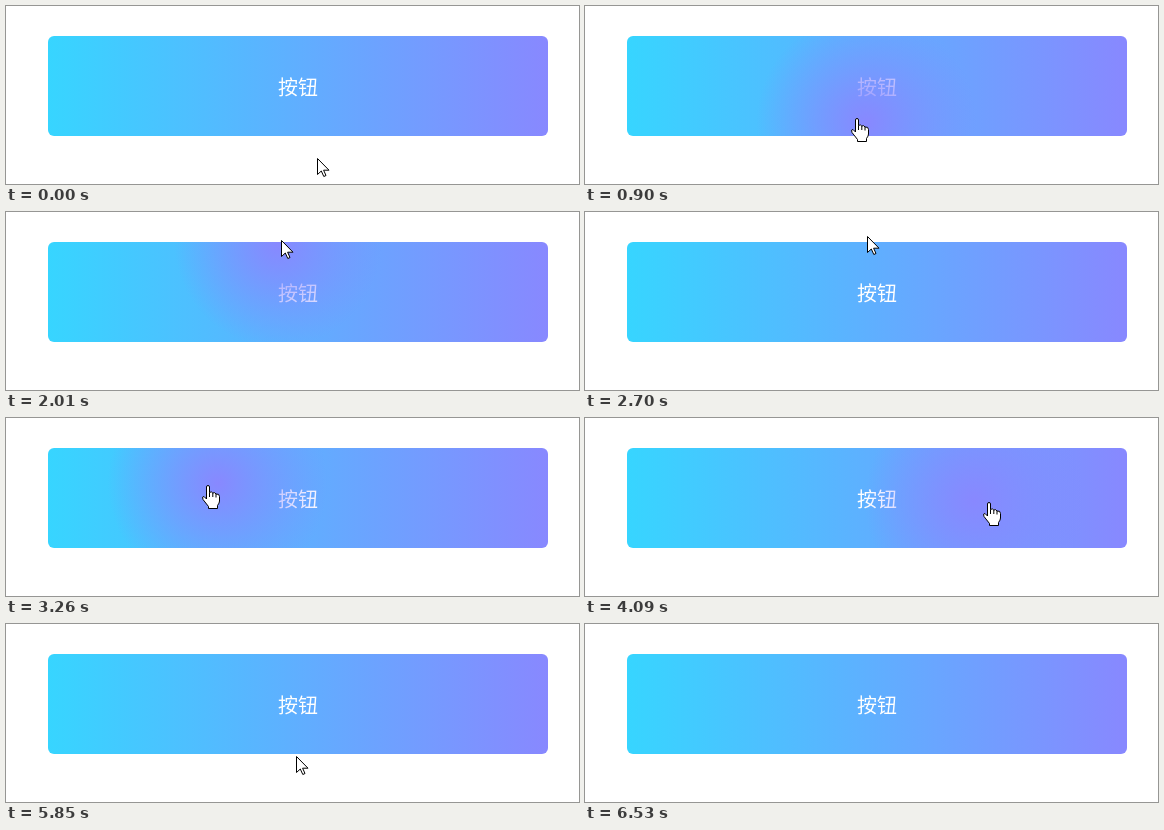
An HTML page that plays this animation: 573 px wide and 178 px high, repeating every 6.86 s.

```html
<!DOCTYPE html>
<html lang="zh-CN">
<head>
<meta charset="utf-8">
<title>按钮</title>
<style>
  html, body { margin: 0; width: 100%; height: 100%; overflow: hidden; background: #fff; }
  .button {
    position: absolute; left: 42px; top: 30px; width: 500px; height: 100px;
    border-radius: 6px; overflow: hidden;
    background: linear-gradient(to right, #37d5ff, #8888ff);
    color: #fff; text-align: center;
    font: 20px/102px "Noto Sans CJK SC", "Noto Sans CJK", sans-serif;
  }
  .glow {
    position: absolute; left: 0; top: 0; border-radius: 50%;
    background: radial-gradient(circle closest-side, #8888ff, transparent);
  }
  svg { position: absolute; left: 0; top: 0; width: 24px; height: 28px; overflow: visible; }
  svg path { fill: #fff; stroke: #000; stroke-linejoin: round; }
</style>
</head>
<body>
<div class="button">按钮<div class="glow"></div></div>
<svg class="arrow"><path d="M.5 .5V16.5L4.3 13L6.8 18.5L9 17.5L6.6 12.2H12Z"/></svg>
<svg class="hand"><path d="M-2.5 14V2Q-2.5 .5-1 .5T.5 2V7.5Q2.5 6 3.8 8Q6 6.800 7 9Q10.500 8.500 10.500 11.500V16Q10.500 18 8.500 20.500V23.500H-.5V21.500L-6 14.500Q-7.500 11.500-5 11.500Z"/><path d="M.5 7.500V12M3.800 8V12M7 9V12.500" fill="none"/></svg>
<script>
const LOOP = 6860, STEP = 69.3, GONE = 6500;
const LAG = 60, GROW = 200, SIZE = 220;
const BOX = { x: 42, y: 30, w: 500, h: 100 };

// Turning points of the pointer: time, x, y
const path = [
  [0, 311, 152], [660, 308, 128], [900, 273, 112], [1280, 247, 82],
  [2010, 275, 28], [2290, 293, 15], [2490, 293, 15], [3260, 203, 67],
  [3500, 166, 69], [4140, 409, 86], [4560, 303, 100], [5120, 282, 140],
  [5400, 285, 126], [5520, 286, 132], [5850, 291, 132], [6040, 330, 128],
  [GONE, 437, 166]
];

const $ = s => document.querySelector(s);
const glow = $('.glow'), arrow = $('.arrow'), hand = $('.hand');
const clamp = v => Math.max(0, Math.min(1, v));
const smooth = v => v * v * (3 - 2 * v);

// Smooth curve that never overshoots a turning point
function slope(i, axis) {
  if (i === 0 || i === path.length - 1) return 0;
  const rate = j => (path[j + 1][axis] - path[j][axis]) / (path[j + 1][0] - path[j][0]);
  const a = rate(i - 1), b = rate(i);
  return a * b > 0 ? 2 * a * b / (a + b) : 0;
}

function coord(t, axis) {
  const next = path.findIndex(p => p[0] > t);
  if (next < 1) return path[next ? path.length - 1 : 0][axis];
  const i = next - 1, a = path[i], b = path[next];
  const span = b[0] - a[0], k = (t - a[0]) / span, r = 1 - k;
  return a[axis] + (b[axis] - a[axis]) * smooth(k) +
    span * k * r * (r * slope(i, axis) - k * slope(next, axis));
}

const pointAt = t => [coord(t, 1), coord(t, 2)];

function isInside(t) {
  const [x, y] = pointAt(t);
  return x >= BOX.x && x < BOX.x + BOX.w && y >= BOX.y && y < BOX.y + BOX.h;
}

// Spans of time the pointer spends over the button
const hovers = [];
for (let t = 10; t < LOOP; t += 10) {
  if (!isInside(t)) continue;
  if (!isInside(t - 10)) hovers.push({ from: t });
  hovers[hovers.length - 1].to = t + 10;
}

function place(el, x, y, visible) {
  el.style.display = visible ? '' : 'none';
  el.style.transform = `translate(${x}px, ${y}px)`;
}

function draw(t) {
  const [x, y] = pointAt(t).map(Math.round);
  const inside = isInside(t);
  place(arrow, x, y, !inside && t <= GONE);
  place(hand, x, y, inside);

  const { from, to } = hovers.find(h => t >= h.from && t < h.to + GROW) || { from: t, to: t };
  const grown = smooth(clamp((Math.min(t, to) - from) / GROW));
  const size = SIZE * grown * (1 - smooth(clamp((t - to) / GROW)));
  const [gx, gy] = pointAt(Math.min(t - LAG, to));
  glow.style.width = glow.style.height = size + 'px';
  place(glow, gx - BOX.x - size / 2, gy - BOX.y - size / 2, size > 0);
}

function tick() {
  const t = performance.now() % LOOP;
  draw(Math.floor(t / STEP + 0.25) * STEP);
  requestAnimationFrame(tick);
}
tick();
</script>
</body>
</html>
```
